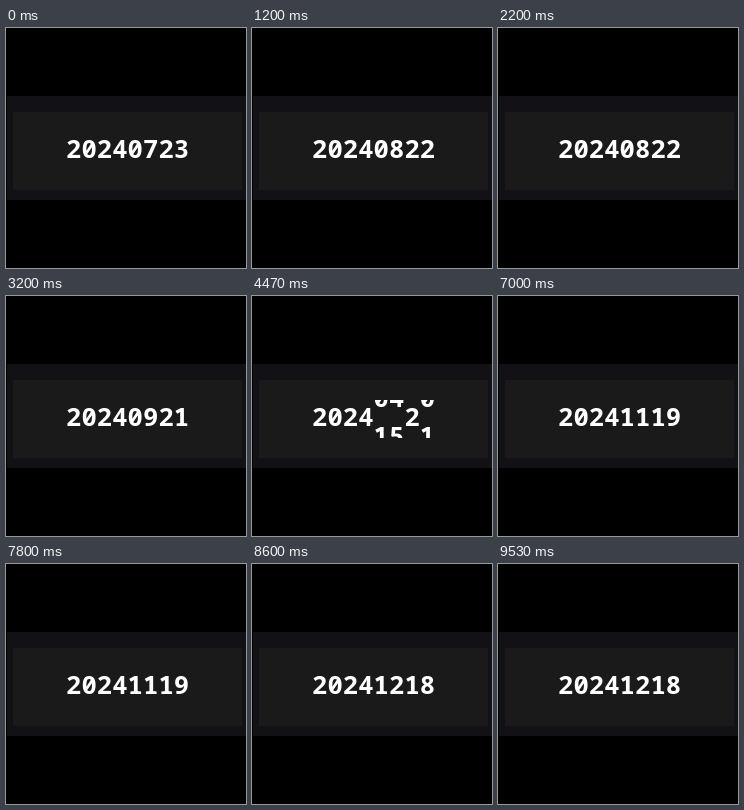
These frames come from a looping animation (240 px wide and 240 px high, 9.59 s). An HTML page with a canvas:

```html
<!DOCTYPE html>
<html lang="en">
<head>
<meta charset="utf-8">
<style>
  html, body { margin: 0; width: 100%; height: 100%; overflow: hidden; background: #000; }
  canvas { display: block; }
</style>
</head>
<body>
<canvas width="240" height="240"></canvas>
<script>
const ctx = document.querySelector('canvas').getContext('2d');
const dates = ['20240723', '20240822', '20240921', '20241020', '20241119', '20241218'];
const LOOP = 9590, FPS = 15;
const STEP = 27, HOLD = 9, ROLL = 9; // in ticks: whole date change, rest before it, roll itself
const ROW = 38, LEFT = 60, PITCH = 15.4, BASELINE = 130.3;
const WINDOW = { top: 104, height: 38 };

const clamp01 = p => Math.min(1, Math.max(0, p));
const easeInOut = p => p < 0.5 ? 4 * p ** 3 : 1 - 4 * (1 - p) ** 3;

function panel(color, x, y, w, h) {
  ctx.fillStyle = color;
  ctx.fillRect(x, y, w, h);
}

function drawDigit(digit, x, y) {
  ctx.fillText(digit, x, y);
  if (digit === 0) { // slashed zero
    ctx.beginPath();
    ctx.moveTo(x - 2.8, y - 5.5);
    ctx.lineTo(x + 2.8, y - 12.8);
    ctx.stroke();
  }
}

// Draws the part of a 0-9 strip that is visible at a fractional position.
function drawReel(position, column) {
  const x = LEFT + PITCH * (column + 0.5);
  for (let digit = 0; digit < 10; digit++) {
    const offset = digit - position;
    if (Math.abs(offset) < 1.2) drawDigit(digit, x, BASELINE + offset * ROW);
  }
}

function draw(time) {
  const tick = Math.floor(time * FPS / 1000 + 0.05);
  const index = Math.min(Math.floor(tick / STEP), dates.length - 2);
  const progress = easeInOut(clamp01((tick - index * STEP - HOLD + 0.5) / ROLL));

  panel('#000', 0, 0, 240, 240);
  panel('#121216', 1, 68, 239, 104);
  panel('#1a1a1b', 7, 84, 229, 78);

  ctx.save();
  ctx.beginPath();
  ctx.rect(0, WINDOW.top, 240, WINDOW.height);
  ctx.clip();
  ctx.font = 'bold 25.6px "Noto Sans Mono", monospace';
  ctx.textAlign = 'center';
  ctx.fillStyle = ctx.strokeStyle = '#fff';
  ctx.lineWidth = 1.8;
  for (let column = 0; column < 8; column++) {
    const from = +dates[index][column], to = +dates[index + 1][column];
    drawReel(from + (to - from) * progress, column);
  }
  ctx.restore();
}

function frame() {
  draw(performance.now() % LOOP);
  requestAnimationFrame(frame);
}
frame();
</script>
</body>
</html>
```
